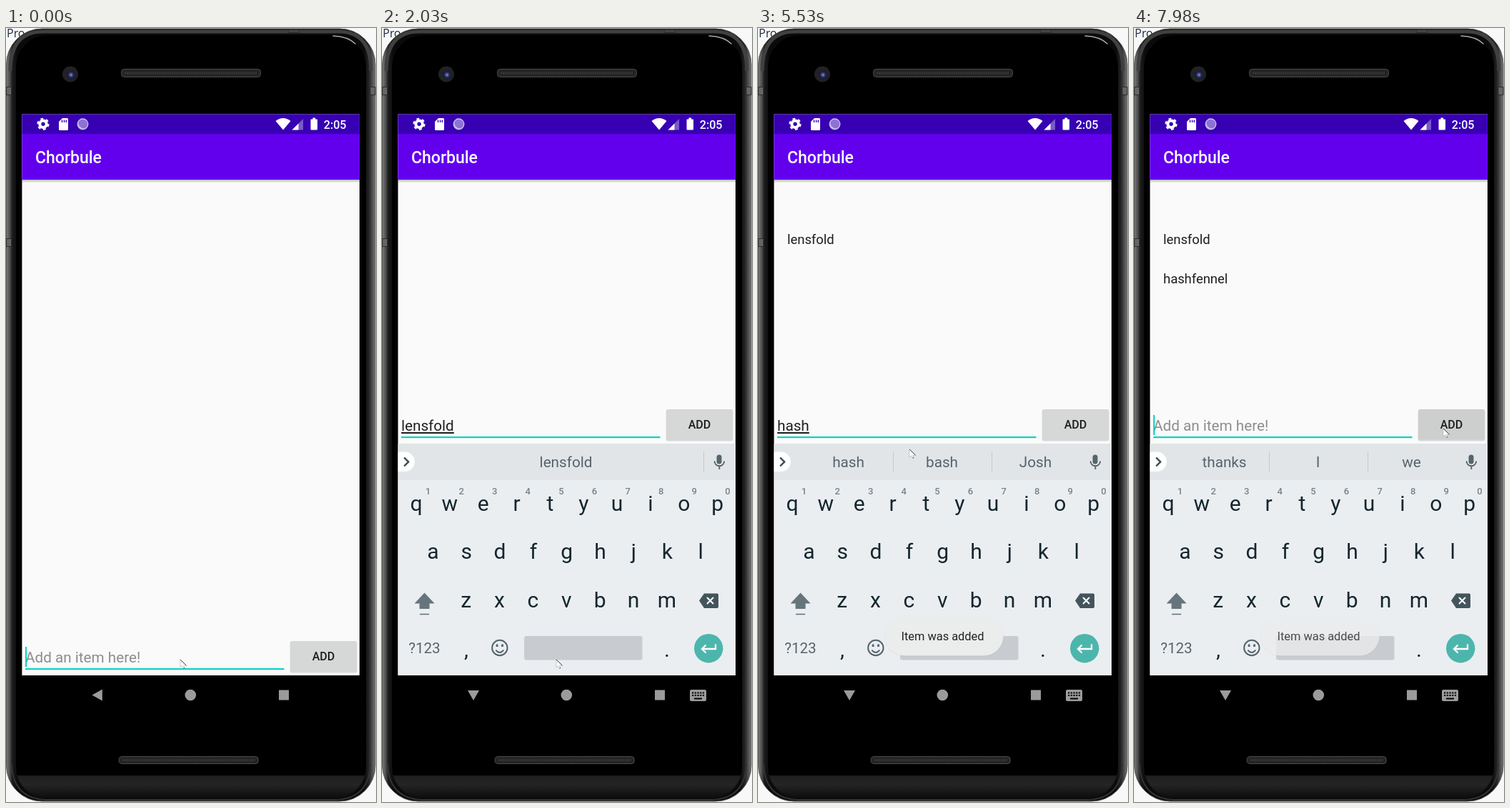
Recreate the animation shown at these times as an HTML page. Size 518 px wide and 1082 px high, loop 8000 ms.

```html
<!DOCTYPE html>
<html lang="en">
<head>
<meta charset="utf-8">
<title>To-do list</title>
<style>
html, body { margin: 0; width: 100%; height: 100%; overflow: hidden; background: #f8f8f8; }
svg { display: block; width: 100%; height: 100%; font-family: Roboto, sans-serif; }
.mid { text-anchor: middle; }
.key { font-size: 30px; fill: #14262e; }
.num { font-size: 13px; font-weight: 500; fill: #76828a; }
.sug { font-size: 20.7px; fill: #56646b; }
.edit { font-size: 20.7px; fill: #212121; }
.item { font-size: 18.4px; fill: #1e1e1e; }
#typed { text-decoration: underline; text-decoration-thickness: 1.2px; text-underline-offset: 2.2px; }
</style>
</head>
<body>
<svg id="stage" viewBox="0 0 518 1082">
  <defs>
    <linearGradient id="side">
      <stop offset="0" stop-color="#7c7c7c"/><stop offset=".009" stop-color="#505050"/>
      <stop offset=".016" stop-color="#1c1c1c"/><stop offset=".03" stop-color="#0b0b0b"/>
      <stop offset=".97" stop-color="#0b0b0b"/><stop offset=".982" stop-color="#222"/>
      <stop offset=".992" stop-color="#505050"/><stop offset="1" stop-color="#777"/>
    </linearGradient>
    <linearGradient id="face" x2="0" y2="1">
      <stop offset=".969" stop-color="#000"/><stop offset=".971" stop-color="#202020"/>
      <stop offset=".982" stop-color="#242424"/><stop offset="1" stop-color="#0c0c0c"/>
    </linearGradient>
    <linearGradient id="drop" x2="0" y2="1">
      <stop offset="0" stop-color="#000" stop-opacity=".3"/><stop offset="1" stop-color="#000" stop-opacity="0"/>
    </linearGradient>
    <radialGradient id="lens">
      <stop offset="0" stop-color="#98a3e0"/><stop offset=".25" stop-color="#434c94"/>
      <stop offset=".6" stop-color="#1b1d36"/><stop offset="1" stop-color="#202022"/>
    </radialGradient>
  </defs>

  <rect width="518" height="1082" fill="#f8f8f8"/>
  <text x="1" y="12.5" font-size="16" fill="#1f2f40" style="font-family:'Open Sans',sans-serif">Pro</text>

  <!-- phone body -->
  <rect x=".5" y="1" width="516.5" height="1080" rx="50" fill="url(#side)" stroke="#555"/>
  <path d="M6 60Q6 5 52 5H466Q511 5 511 60" fill="none" stroke="#404040" stroke-width="5"/>
  <path d="M8 1030Q10 1077 56 1079H462Q508 1077 510 1030" fill="none" stroke="#333" stroke-width="2"/>
  <rect x="14" y="10" width="490" height="1067" rx="44" fill="url(#face)"/>
  <path d="M458 11Q479 12 489 22" fill="none" stroke="#aaa" stroke-width="1.5" stroke-linecap="round"/>
  <g fill="#666" stroke="#2a2a2a"><path d="M.5 82.500h7v11h-7zM.5 294.500h7v11h-7zM510 82.500h7v11h-7z"/><path d="M395 2.500h15v4h-15z" fill="#444"/></g>
  <g fill="#242424" stroke="#4c4c4c">
    <rect x="161.500" y="57.500" width="195" height="11" rx="4"/>
    <rect x="158.200" y="1018.500" width="195" height="10" rx="4"/>
  </g>
  <path d="M166 63H352M163 1023.500H349" stroke="#363636" stroke-width="3" stroke-dasharray="2 1"/>
  <circle cx="90" cy="64.500" r="11" fill="#222224"/>
  <circle cx="91" cy="65.500" r="7.500" fill="url(#lens)"/>

  <!-- screen -->
  <rect x="22.400" y="120.500" width="472.500" height="784.500" fill="#fafafa"/>
  <rect x="22.400" y="211.500" width="472.500" height="5" fill="url(#drop)"/>
  <rect x="22.400" y="148" width="472.500" height="64" fill="#6200ee"/>
  <rect x="22.400" y="120.500" width="472.500" height="27.700" fill="#3700b3"/>
  <text x="41" y="189" font-size="23" font-weight="500" fill="#fff">Chorbule</text>
  <g fill="#fff">
    <circle cx="52" cy="134.300" r="4.700" fill="none" stroke="#fff" stroke-width="4"/>
    <circle cx="52" cy="134.300" r="7.300" fill="none" stroke="#fff" stroke-width="2.600" stroke-dasharray="3.820 3.820"/>
    <path d="M79 126h6.500q1.500 0 1.500 1.500v14q0 1.500-1.500 1.500h-10q-1.500 0-1.500-1.500V131z"/>
    <path d="M78.500 128.500v3.500M81.500 128.500v3.500M84.300 128.500v3.500" stroke="#3700b3" stroke-width="1.400"/>
    <circle cx="107.500" cy="134.300" r="7.300" fill="#8d72d2" stroke="#cfc3ee" stroke-width="1.300"/>
    <path d="M102 130a7 7 0 0 0 10 9.500A7.300 7.300 0 0 1 102 130" fill="#e4dcf6"/>
    <path d="M388 142.500L377.500 130Q388 122 398.500 130z"/>
    <path d="M416 127v15.500h-15.500z" opacity=".35"/>
    <path d="M409.500 133.500v9h-9z"/>
    <path d="M429.500 125.500h3.500v2h2q1 0 1 1V141.500q0 1-1 1h-7.500q-1 0-1-1V128.500q0-1 1-1h2z"/>
    <text x="444.800" y="140.500" font-size="16.100" font-weight="500">2:05</text>
  </g>
  <text class="item" id="item1" x="41" y="302">lensfold</text>
  <text class="item" id="item2" x="41" y="357">hashfennel</text>

  <g id="row">
    <text class="edit" id="hint" x="27" y="563" fill-opacity=".5">Add an item here!</text>
    <text class="edit" id="typed" x="27" y="563"></text>
    <rect x="27" y="571" width="362.500" height="2.200" fill="#0cd3c3"/>
    <rect id="caret" y="541" width="2" height="28" fill="#0cd3c3"/>
    <rect x="397.500" y="534" width="94" height="43.500" rx="3" opacity=".13"/>
    <rect x="398" y="533" width="93" height="42.500" rx="2" fill="#d6d7d7"/>
    <rect id="press" x="398" y="533" width="93" height="42.500" rx="2"/>
    <text class="mid" x="444.500" y="559.600" font-size="16" font-weight="500" fill="#1c1c1c">ADD</text>
  </g>

  <!-- navigation -->
  <g fill="#9b9b9b">
    <path id="back" d="M120.500 932.500L134.800 924.500V940.500z"/>
    <path id="down" d="M120 926H136L128 940z"/>
    <circle cx="258.300" cy="932.500" r="7.800"/>
    <rect x="382" y="925.500" width="14" height="14"/>
    <g id="kbIcon">
      <rect x="431" y="925" width="23" height="16" rx="2"/>
      <path d="M434 929.500H451M434 933H451" stroke="#000" stroke-width="2" stroke-dasharray="2.200 1.500"/>
      <path d="M437 937.500H448" stroke="#000" stroke-width="2"/>
    </g>
  </g>

  <g id="board">
    <rect x="22.400" y="632" width="472.500" height="273" fill="#ebeef1"/>
    <rect x="22.400" y="581" width="472.500" height="51" fill="#e1e5e8"/>
    <path d="M22.400 592.500H32a13.700 13.700 0 0 1 0 27.400H22.400z" fill="#fff"/>
    <path d="M31 600.500l6 6-6 6" fill="none" stroke="#37474f" stroke-width="2.400"/>
    <path id="split" d="M189.500 592v28M327.500 592v28" stroke="#c3c9cd"/>
    <path id="endSplit" d="M450.500 592v28" stroke="#c3c9cd"/>
    <g id="sugs"></g>
    <rect x="468.500" y="596.500" width="7" height="13" rx="3.500" fill="#56646b"/>
    <path d="M465.500 605.500a6.800 6.800 0 0 0 13.600 0M472.300 612v5" fill="none" stroke="#56646b" stroke-width="1.900"/>
    <g id="keys"></g>
    <path d="M59.500 789.500L73.500 804.500H66.500V812H52.500V804.500H45.500z" fill="#66757c"/>
    <path d="M53 819.500H66" stroke="#66757c" stroke-width="1.600"/>
    <path d="M444 800.500L451 790.500H469q2 0 2 2V809q0 2-2 2H451z" fill="#44545c"/>
    <path d="M455 796l9 9M464 796l-9 9" stroke="#fff" stroke-width="2.100"/>
    <g fill="none" stroke="#56646b" stroke-width="2">
      <circle cx="164.800" cy="866.500" r="10.700"/><path d="M159.300 869.500q5.500 7 11 0"/>
    </g>
    <path d="M161.100 861.500v3.500M168.500 861.500v3.500" stroke="#56646b" stroke-width="2.800"/>
    <rect x="199" y="850" width="165.500" height="33.500" rx="3" fill="#c8ccd0"/>
    <text class="mid" x="59.500" y="874" font-size="20.500" fill="#56646b">?123</text>
    <circle cx="457.200" cy="867.200" r="20.200" fill="#4db6ac"/>
    <path d="M467 861.500V868H448.500M453.500 862.500L448 868l5.500 5.500" fill="none" stroke="#fff" stroke-width="2.300"/>
  </g>

  <g id="toast">
    <rect x="177" y="822.500" width="167" height="56" rx="28" opacity=".05"/>
    <rect x="177.500" y="822" width="166" height="55.500" rx="27.700" fill="#ebecec"/>
    <text class="mid" x="258.500" y="855.700" font-size="16.400" fill="#222">Item was added</text>
  </g>

  <g id="mouse">
    <path d="M0 0V11L2.800 8.700L4.500 12.500L6.200 11.700L4.600 8.200H8.500z" fill="#fff" stroke="#aaa" stroke-width=".6"/>
    <path d="M0 0L8.500 8.200M4.500 12L6 11.500" stroke="#333" stroke-width=".9"/>
  </g>
</svg>
<script>
const LOOP = 8000;
const $ = id => document.getElementById(id);
const clamp = v => Math.max(0, Math.min(1, v));
const ramp = (t, from, length) => clamp((t - from) / length);
const easeOut = p => 1 - (1 - p) ** 2;
const show = (id, on) => $(id).setAttribute('visibility', on ? 'visible' : 'hidden');
const fade = (id, v) => $(id).setAttribute('opacity', v);
const last = (list, t) => list.reduce((hit, e) => e[0] <= t ? e : hit);

const idle = 'thanks|I|we';
// time, content of the text field
const typing = [
  [-160, ''], [490, 'l'], [670, 'le'], [790, 'len'], [860, 'lens'], [1080, 'lensf'],
  [1230, 'lensfo'], [1350, 'lensfol'], [1500, 'lensfold'], [3660, ''],
  [4520, 'h'], [4630, 'ha'], [4850, 'has'], [5030, 'hash'],
  [5680, 'hashf'], [5830, 'hashfe'], [5980, 'hashfen'],
  [6300, 'hashfenn'], [6400, 'hashfenne'], [6510, 'hashfennel'], [7800, '']
];
// time, suggestions; * is the typed text, ! marks bold
const hints = [
  [0, idle], [490, "*|I'll|look"], [670, "*|!let|let's"], [790, '*|!let|lend'],
  [860, '*|lend|lenses'], [1080, '*|!lens|lens of'], [1500, '|*|'], [3690, idle],
  [4520, '*|have|he'], [4630, '*|have|had'], [5030, '*|bash|Josh'],
  [5680, '*|!hash|hashes'], [6300, '*|!hashfennell|hashfennelssss'], [7870, idle]
];
// time, x, y
const path = [
  [0, 244, 883], [2180, 244, 883], [2480, 390, 730], [2720, 498, 600], [2960, 421, 530],
  [3110, 421, 530], [3260, 421, 549], [3660, 421, 549], [3800, 410, 549], [4100, 212, 589],
  [7060, 212, 589], [7560, 433, 560], [LOOP, 433, 560]
];

const label = (x, y, cls, s) => `<text class="mid ${cls}" x="${x}" y="${y}">${s}</text>`;
const keyRow = (s, x, y) => [...s].map((c, i) => label(x + i * 46.85, y, 'key', c)).join('');
$('keys').innerHTML = keyRow('qwertyuiop', 48, 675) + keyRow('asdfghjkl', 71.3, 742) +
  keyRow('zxcvbnm', 117.7, 810) + label(118, 879, 'key', ',') + label(399, 879, 'key', '.') +
  [...'1234567890'].map((c, i) => label(64.5 + i * 46.6, 652, 'num', c)).join('');

function suggestion(word, i) {
  const bold = word[0] === '!';
  const s = bold ? word.slice(1) : word;
  const squeeze = s.length > 12 ? 0.8 : 1;
  return `<text class="mid sug" font-weight="${bold ? 700 : 400}"
    transform="translate(${126.5 + i * 131} 614) scale(${squeeze} 1)">${s}</text>`;
}

function pointer(t) {
  const i = Math.max(1, path.findIndex(p => p[0] > t));
  const [a, b] = [path[i - 1], path[i]];
  const p = ramp(t, a[0], b[0] - a[0]);
  return [a[1] + (b[1] - a[1]) * p, a[2] + (b[2] - a[2]) * p];
}

const pressed = (t, down, up) => ramp(t, down, 50) * (1 - ramp(t, up, 300));

let shown = '';
function draw(t) {
  const [typedAt, text] = last(typing, t);
  $('typed').textContent = text;
  show('hint', !text);
  $('caret').setAttribute('x', 27 + (text ? $('typed').getComputedTextLength() : 0));
  show('caret', (t - typedAt) % 1000 < 500);

  const words = last(hints, t)[1].replace('*', text);
  if (words !== shown) {
    shown = words;
    $('sugs').innerHTML = words.split('|').map(suggestion).join('');
    show('split', words[0] !== '|');
    show('endSplit', words[0] === '|');
  }

  const open = t >= 550;
  $('row').setAttribute('transform', `translate(0 ${open ? 0 : 324})`);
  show('back', !open);
  show('down', open);
  show('kbIcon', open);
  // the slide pauses briefly just before it settles
  const rest = (1 - ramp(t < 790 ? Math.min(t, 670) : t, 550, 240)) ** 3;
  $('board').setAttribute('transform', `translate(0 ${32 * rest})`);
  fade('board', 1 - rest);

  show('item1', t >= 3660);
  show('item2', t >= 7800);
  fade('press', 0.08 * (pressed(t, 3480, 3800) + pressed(t, 7620, 7850)));
  fade('toast', easeOut(ramp(t, 3700, 400)) - ramp(t, 5680, 400) ** 2 + easeOut(ramp(t, 7770, 400)));
  $('mouse').setAttribute('transform', `translate(${pointer(t)})`);
}

const start = performance.now();
function tick() {
  draw((performance.now() - start) % LOOP);
  requestAnimationFrame(tick);
}
tick();
</script>
</body>
</html>
```
